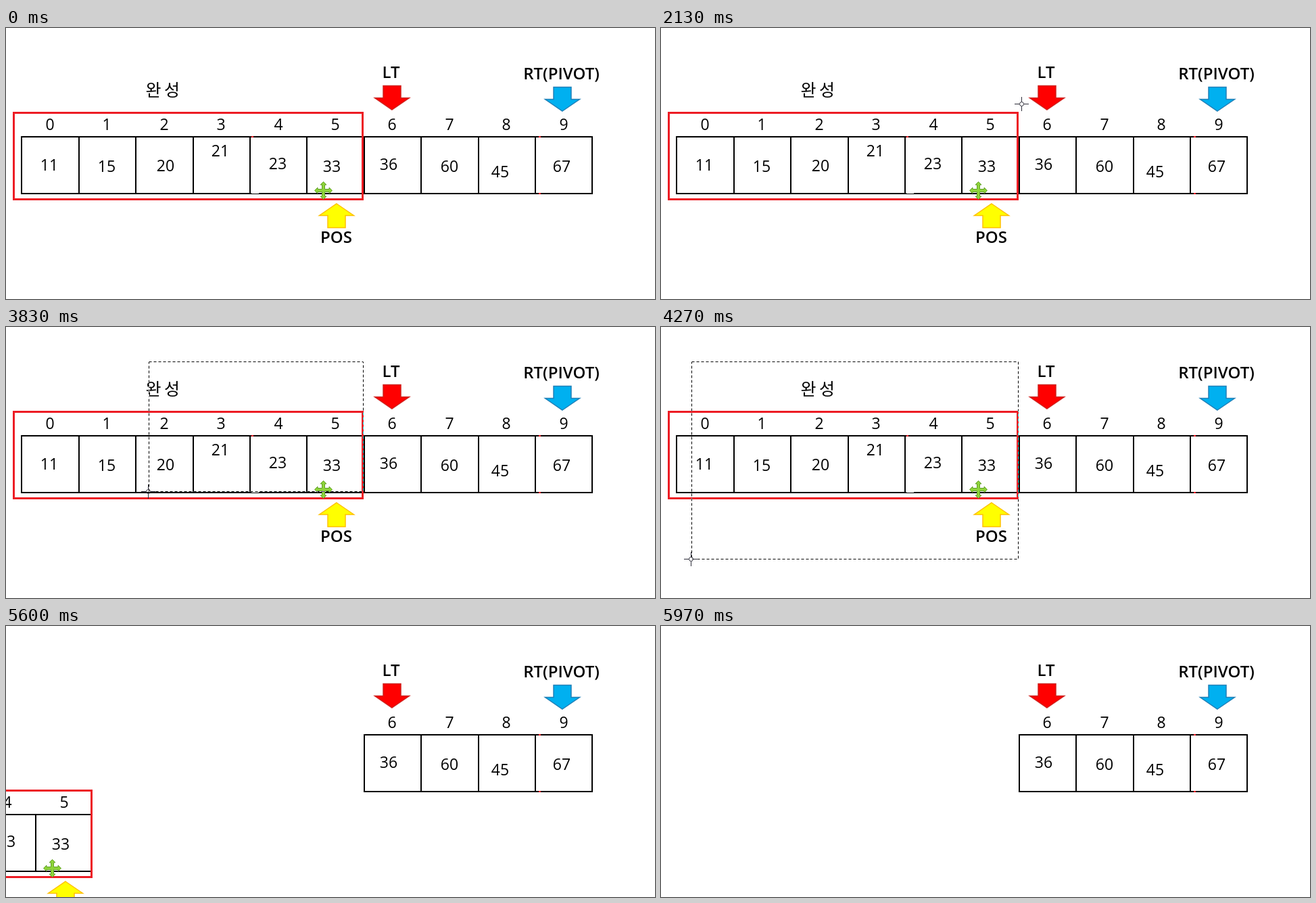
These frames come from a looping animation (960x401 px, 8 s). An HTML page with a canvas:

```html
<!DOCTYPE html>
<html lang="ko">
<head>
<meta charset="utf-8">
<title>Quick sort: finished part</title>
<style>
html, body { margin: 0; width: 100%; height: 100%; overflow: hidden; background: #fff; }
canvas { display: block; width: 960px; height: 401px; }
</style>
</head>
<body>
<canvas id="stage" width="960" height="401"></canvas>
<script>
const ctx = document.getElementById('stage').getContext('2d');
const LOOP = 8000;
const SANS = '"Open Sans", "Noto Sans", sans-serif';
const RED = '#ed1c24';
const CELL = 84.4;
const SEL = { right: 528, top: 51, bottom: 343 };

// value and its hand-placed nudge inside the cell
const VALUES = [
  [11, -1, -1], [15, 0, 1], [20, 2, 0], [21, -1, -22], [23, -1, -3],
  [33, -5, 1], [36, -5, -2], [60, 0, 1], [45, -9, 9], [67, -3, 1]
];

// Each pointer move starts where the one before ended
const MOVES = [
  { from: 730, to: 1370, path: [[545, 220], [535, 45], [75, 95]] },
  { from: 1370, to: 2370, path: [[30, 330], [500, 345], [541, 55]] },
  { from: 2530, to: 2670, path: [[526, 55]] },
  { from: 2930, to: 3070, path: [[528, 51]] },
  { from: 3500, to: 4300, path: [[43, 343]] },
  { from: 4300, to: 4500, path: [[-14, 343]] },
  { from: 4730, to: 5030, path: [[295, 259]] },
  { from: 5100, to: 5430, path: [[-16, 378]] }
];

const clamp = p => Math.max(0, Math.min(1, p));
const lerp = (a, b, p) => Math.round(a + (b - a) * p);
const easeOut = p => p * (2 - p);

// Point at share p of the length of a polyline
function along(points, p) {
  const steps = points.slice(1).map(([x, y], i) => Math.hypot(x - points[i][0], y - points[i][1]));
  let rest = p * steps.reduce((a, b) => a + b);
  let i = 0;
  while (i < steps.length - 1 && rest > steps[i]) rest -= steps[i++];
  const [a, b] = [points[i], points[i + 1]], q = clamp(rest / steps[i]);
  return [lerp(a[0], b[0], q), lerp(a[1], b[1], q)];
}

function pointer(t) {
  let at = [0, 378];
  for (const { from, to, path } of MOVES) {
    if (t < from) break;
    at = along([at, ...path], easeOut(clamp((t - from) / (to - from))));
  }
  return at;
}

function rect(color, x, y, w, h) {
  ctx.fillStyle = color;
  ctx.fillRect(x, y, w, h);
}

function label(text, x, base, font) {
  ctx.font = font;
  ctx.textAlign = 'center';
  ctx.fillStyle = '#000';
  ctx.fillText(text, x, base);
}

function shape(points, fill, line, width = 1) {
  ctx.beginPath();
  points.forEach(([x, y]) => ctx.lineTo(x, y));
  ctx.closePath();
  ctx.fillStyle = fill;
  ctx.fill();
  ctx.strokeStyle = line;
  ctx.lineWidth = width;
  ctx.stroke();
}

// Block arrow with its tip at (x, y); dir 1 points down, -1 up
function arrow(x, y, dir, fill, line) {
  const half = [[0, 0], [25.5, -17.5], [13, -17.5], [13, -35.5]];
  const mirror = half.slice(1).reverse().map(([a, b]) => [-a, b]);
  shape(half.concat(mirror).map(([a, b]) => [x + a, y + b * dir]), fill, line, 1.5);
}

function fourWay(x, y, size, shaft, fill, line) {
  const neck = size - 4.5, wing = 4.5;
  const side = [[-shaft, -shaft], [-shaft, -neck], [-wing, -neck], [0, -size], [wing, -neck], [shaft, -neck]];
  const points = [];
  for (let k = 0; k < 4; k++) {
    const c = Math.cos(k * Math.PI / 2), s = Math.sin(k * Math.PI / 2);
    side.forEach(([a, b]) => points.push([x + a * c - b * s, y + a * s + b * c]));
  }
  shape(points, fill, line);
}

function crosshair(x, y) {
  const ink = '#2c2c38';
  for (const d of [-10, 4]) {
    rect(ink, x + d, y, 7, 1);
    rect(ink, x, y + d, 1, 7);
  }
  ctx.beginPath();
  ctx.arc(x + 0.5, y + 0.5, 3, 0, Math.PI * 2);
  ctx.strokeStyle = ink;
  ctx.lineWidth = 1;
  ctx.stroke();
}

function board() {
  for (const y of [160, 244]) rect('#000', 22, y, 846, 2);
  for (let i = 0; i <= 10; i++) rect('#000', Math.round(22.3 + i * CELL), 160, 2, 86);
  rect('#fff', 363, 244, 11, 1);
  for (const [x, y] of [[363, 160], [788, 160], [788, 244]]) rect(RED, x, y, 3, 2);

  const digits = '23px ' + SANS, bold = '600 24px ' + SANS;
  VALUES.forEach(([value, dx, dy], i) => {
    const x = Math.round(65 + i * CELL);
    label(i, x, 151, digits);
    label(value, x + dx, 212 + dy, digits);
  });
  label('LT', 569.5, 74, bold);
  label('RT(PIVOT)', 821.5, 76, bold);
  label('POS', 488.5, 318, bold);
  const hangul = '500 25px "Noto Sans CJK KR", "Noto Sans CJK", sans-serif';
  label('완', 218, 101, hangul);
  label('성', 245.5, 101, hangul);

  arrow(571, 121, 1, '#ff0000', '#d0201c');
  arrow(823, 123, 1, '#00b0f0', '#2080b8');
  arrow(489, 260, -1, '#ffff00', '#ffc000');

  ctx.strokeStyle = RED;
  ctx.lineWidth = 3;
  ctx.strokeRect(11.5, 125.5, 516, 128);
  fourWay(469.5, 240.5, 13, 2, '#8ed43a', '#62a028');
}

function marquee(left, bottom, handles) {
  const { right, top } = SEL;
  ctx.save();
  ctx.globalCompositeOperation = 'difference';
  ctx.strokeStyle = '#fff';
  ctx.lineWidth = 1;
  ctx.setLineDash([4, 3]);
  ctx.strokeRect(left + 0.5, top + 0.5, right - left, bottom - top);
  ctx.restore();
  if (!handles) return;
  for (let i = 0; i < 9; i++) {
    if (i === 4) continue;
    const x = lerp(left, right, i % 3 / 2), y = lerp(top, bottom, Math.floor(i / 3) / 2);
    rect('#000', x - 2, y - 2, 5, 5);
    rect('#fff', x - 1, y - 1, 3, 3);
  }
}

// The selected block jumps away from its place and slides off the stage
function cutBlock(t) {
  const w = SEL.right + 1, h = SEL.bottom - SEL.top + 1;
  rect('#fff', 0, SEL.top, w, h);
  const p = clamp((t - 5600) / 370);
  ctx.save();
  ctx.translate(lerp(-401, -535, p), lerp(118, 152, p));
  ctx.beginPath();
  ctx.rect(0, SEL.top, w, h);
  ctx.clip();
  board();
  ctx.restore();
}

function draw(t) {
  rect('#fff', 0, 0, 960, 401);
  board();
  if (t >= 5600) return cutBlock(t);
  if (t < 730) return;
  const [x, y] = pointer(t);
  if (t > 3500 && t < 5015) marquee(Math.max(0, x < 43 || t >= 4500 ? 0 : x + 1), t < 4500 ? y : SEL.bottom, t >= 4730);
  if (t < 4730) crosshair(x, y);
  else fourWay(x + 0.5, y + 0.5, 11, 1.5, '#fff', '#22222c');
}

function tick() {
  draw(performance.now() % LOOP);
  requestAnimationFrame(tick);
}
tick();
</script>
</body>
</html>
```
